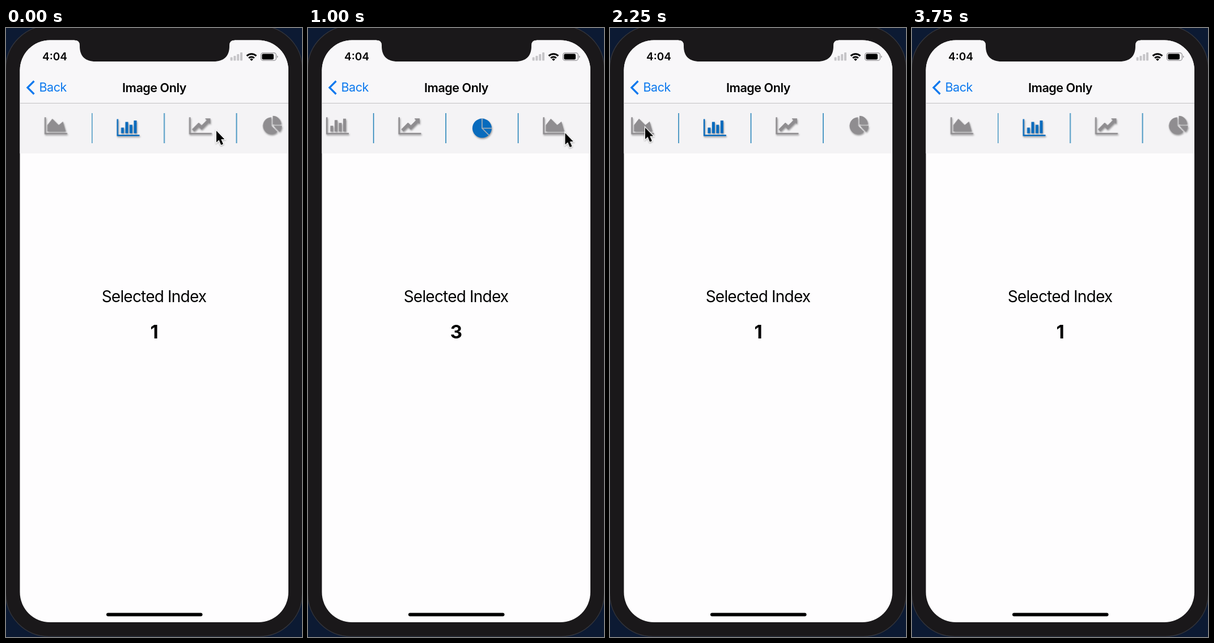
Write an HTML page that moves like this. It is 522 px wide and 1073 px high and loops after 3.8 s.

```html
<!DOCTYPE html>
<html lang="en">
<head>
<meta charset="utf-8">
<title>Segmented control</title>
<style>
  html, body { margin: 0; width: 100%; height: 100%; overflow: hidden; background: #0c1a33; }
  #stage { display: block; width: 522px; height: 1073px; }
  text { font-family: Inter, "Liberation Sans", sans-serif; }
  .icon { filter: drop-shadow(1px 2px 1.5px rgba(0, 0, 0, .38)); }
  .off { fill: #8f8d90; }
  .on { fill: #086bbd; }
  #cursor { filter: drop-shadow(0 1px 1px rgba(0, 0, 0, .35)); }
</style>
</head>
<body>
<svg id="stage" viewBox="0 0 522 1073">
  <rect width="522" height="1073" fill="#0c1a33"/>
  <rect x="-.5" y="-4" width="523" height="1076" rx="76" fill="#1a181a" stroke="#35363c" stroke-width="1.2"/>
  <clipPath id="screen"><rect x="24.5" y="21.5" width="473.5" height="1025.5" rx="53"/></clipPath>
  <g clip-path="url(#screen)">
    <rect x="24" y="21" width="475" height="1027" fill="#fefdfe"/>
    <rect x="24" y="21" width="475" height="112" fill="#f8f7f9"/>
    <rect x="24" y="133" width="475" height="88" fill="#f4f3f5"/>
    <rect x="24" y="132" width="475" height="1" fill="#c2c1c4"/>
  </g>
  <path d="M121 20v1.5q9 0 9 9v1.5c0 18 10 27 28 27h208c18 0 28-9 28-27v-1.5q0-9 9-9V20z" fill="#1a181a"/>

  <text x="64" y="57" font-size="19" font-weight="600">4:04</text>
  <g id="signal" fill="#c6c5c8"></g>
  <g fill="none" stroke="#000" stroke-width="3">
    <path d="M424.6 49.1a12 12 0 0 1 16.8 0"/>
    <path d="M428.2 53a7 7 0 0 1 9.6 0"/>
  </g>
  <path d="M430.2 55.2a4 4 0 0 1 5.6 0L433 58z"/>
  <rect x="449.6" y="43.8" width="26.8" height="13.4" rx="3.8" fill="none" stroke="#8d8c8f" stroke-width="1.2"/>
  <rect x="451.4" y="45.6" width="20.6" height="9.8" rx="2.2"/>
  <path d="M478 48.2q3.2 2.3 0 4.6z" fill="#8d8c8f"/>

  <path d="M49.5 93.5L38 105l11.5 11.5" fill="none" stroke="#0a78ee" stroke-width="3.2"/>
  <text x="58.5" y="112.3" font-size="21.5" letter-spacing="-.5" fill="#0a78ee">Back</text>
  <text x="261.5" y="112.5" font-size="21.5" font-weight="600" letter-spacing="-.45" text-anchor="middle">Image Only</text>

  <svg x="24.5" y="133" width="473.5" height="88"><g id="strip"></g></svg>

  <text x="261" y="482.5" font-size="28" letter-spacing="-.8" text-anchor="middle">Selected Index</text>
  <g id="digits"></g>
  <rect x="177" y="1030.5" width="169.5" height="6" rx="3"/>
  <g id="cursor">
    <path d="M0 0V20.5L4.6 16.3 8.2 25 12 23.4 8.3 15H14.3Z" stroke="#fff" stroke-width="2.6" paint-order="stroke"/>
  </g>
</svg>
<script>
const LOOP = 3800, STEP = 50, SEG = 127.5, MAX_SCROLL = 163.5;
const $ = id => document.getElementById(id);

function add(parent, tag, attrs, text = '') {
  const el = document.createElementNS('http://www.w3.org/2000/svg', tag);
  for (const key in attrs) el.setAttribute(key, attrs[key]);
  el.textContent = text;
  return parent.appendChild(el);
}

// Samples a function of time on the 50 ms grid and holds each value.
function play(el, styleAt) {
  const frames = [];
  for (let t = 0; t <= LOOP; t += STEP) {
    frames.push({ offset: t / LOOP, easing: 'steps(1, end)', ...styleAt(Math.min(t, LOOP - STEP)) });
  }
  el.animate(frames, { duration: LOOP, iterations: Infinity });
}

const smooth = (t, start, length) => {
  const p = Math.min(1, Math.max(0, (t - start) / length));
  return p * p * (3 - 2 * p);
};

// Selecting a segment scrolls it towards the centre.
const picks = [[0, 1], [500, 3], [1250, 4], [2033, 1]];
const selectedAt = t => picks.filter(([start]) => start <= t).pop()[1];
const scrollAt = t => MAX_SCROLL * (smooth(t, 500, 300) - smooth(t, 2033, 300));

// Pointer stops: time, x, y
const stops = [
  [0, 371, 181], [100, 374, 181], [350, 468, 176], [450, 461.5, 177.5], [700, 461.5, 177.5],
  [950, 453.5, 185], [1250, 453.5, 185], [1550, 147.5, 210], [1850, 62, 175.5],
  [2300, 62, 175.5], [2650, 160, 394], [2850, 166, 394], [3100, 234, 334], [3280, 524, 26]
];
function pointerAt(t) {
  const i = stops.findIndex(s => s[0] > t);
  if (i < 0) return { transform: 'translate(560px, 26px)' };
  const [t0, x0, y0] = stops[i - 1], [t1, x1, y1] = stops[i];
  const raw = (t - t0) / (t1 - t0);
  const through = t0 === 1250 || t0 === 1550 || t0 >= 2850;
  const k = t0 === 1250 ? raw * raw
    : t0 === 1550 ? raw * (2 - raw)
    : through ? raw : smooth(raw, 0, 1);
  return { transform: `translate(${x0 + (x1 - x0) * k}px, ${y0 + (y1 - y0) * k}px)` };
}

// Icons sit on a 40 by 30 grid.
const axes = 'M0 0H2.5V27.5H40V30H0Z';
const bar = (x, y) => `M${x} ${y}H${x + 5}V25H${x}Z`;
const area = axes + 'M5 25V13.75L13.75 2.5 25 13.75 32.5 7.5 37.5 25Z';
const bars = axes + bar(7.5, 15) + bar(15, 5) + bar(22.5, 10) + bar(30, 2.5);
const line = axes +
  'M5 21.25L16.4 9.8Q16.9 9.4 17.4 9.8L21.9 14.3 31 5.3 28.6 2.9Q28 1.9 29 1.9H37.5V10.6Q37.3 11.8 36.4 11L34.7 9.1 22.4 21.4Q21.9 21.8 21.4 21.4L16.9 16.9 8.75 25Z';
const pie = 'M17.5 15L28.2 25.6A15 15 0 1 1 17.5 0ZM21.2 15H36.2A15 15 0 0 1 31.9 25.7Z' +
  'M20 12.5V-2.5A15 15 0 0 1 35 12.5Z';
const shapes = [area, bars, line, pie, area];

shapes.forEach((d, i) => {
  const x = SEG * (i + .5) - 20.3;
  for (const on of [false, true]) {
    const icon = add($('strip'), 'g', { class: 'icon ' + (on ? 'on' : 'off') });
    const body = add(icon, 'g', { transform: `translate(${x} ${on ? 27.6 : 24.3})` });
    if (on && i === 3) {
      add(body, 'circle', { cx: 20, cy: 16, r: 17 });
      add(body, 'path', { d: 'M20 -1V16H37M20 16L32 28', fill: 'none', stroke: '#9cabb8', 'stroke-width': 1.8 });
    } else {
      add(body, 'path', { d });
    }
    play(icon, t => ({ opacity: (selectedAt(t) === i) === on ? 1 : 0 }));
  }
  if (i) add($('strip'), 'rect', { x: SEG * i - 1.2, y: 17, width: 1.6, height: 53, fill: '#2583b9' });
});

for (const n of [1, 3, 4]) {
  const digit = add($('digits'), 'text',
    { x: 261.5, y: 547, 'font-size': 33, 'font-weight': 700, 'text-anchor': 'middle' }, n);
  play(digit, t => ({ opacity: selectedAt(t) === n ? 1 : 0 }));
}

[6, 8.5, 11.5, 14.5].forEach((h, i) =>
  add($('signal'), 'rect', { x: 395.6 + i * 5.8, y: 57.5 - h, width: 4, height: h, rx: 1 }));

play($('strip'), t => ({ transform: `translate(${-scrollAt(t)}px, 0px)` }));
play($('cursor'), pointerAt);
</script>
</body>
</html>
```
